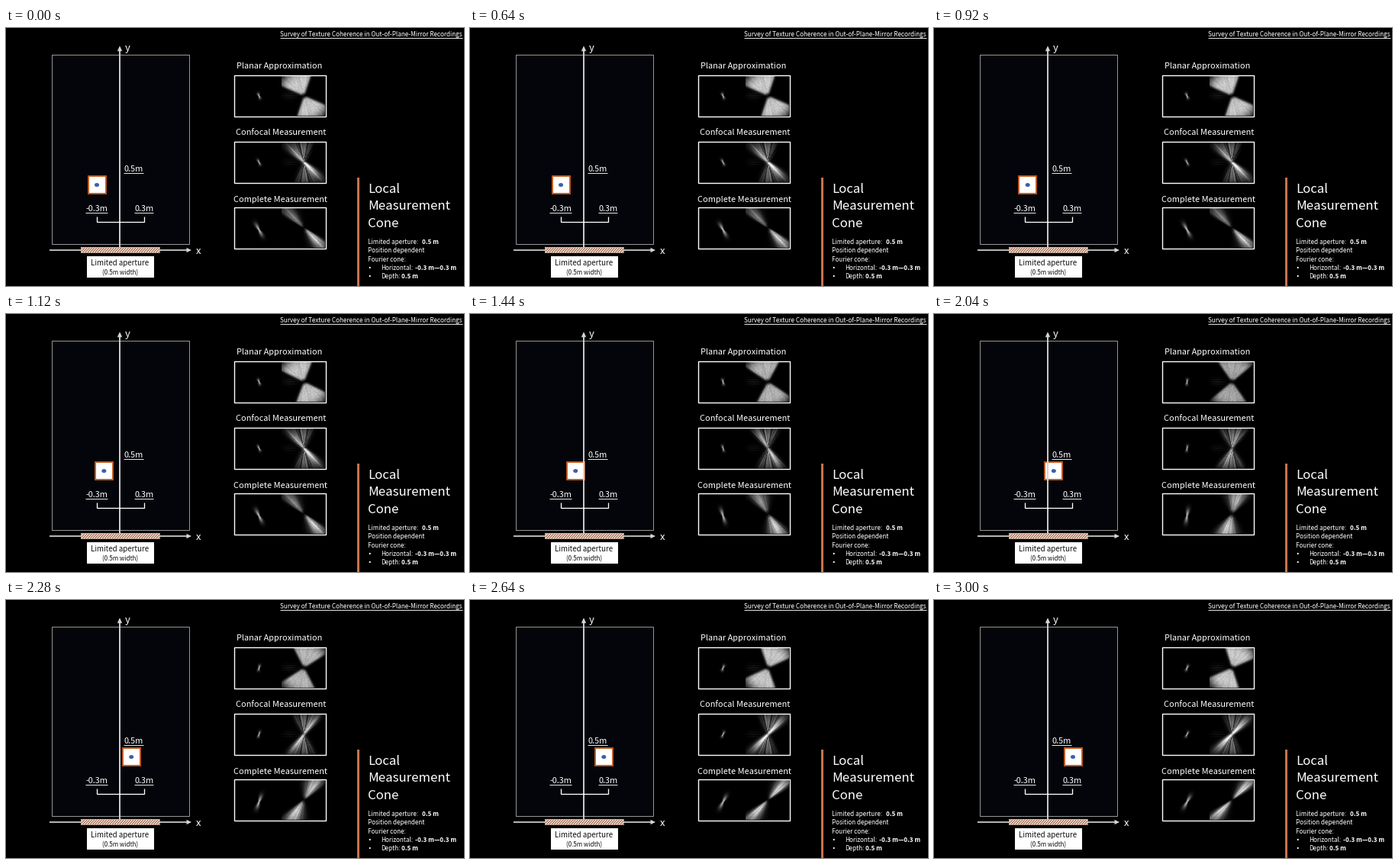
Animation, 600 px wide and 338 px high, one loop 3040 ms. Source, as a matplotlib script:

```python
import numpy as np
import matplotlib.pyplot as plt
from matplotlib.animation import FuncAnimation
from matplotlib.patches import Ellipse, Polygon, Rectangle

W, H, DPI = 600, 338, 64
PT = 72 / DPI
FRAMES, STEP_MS = 76, 40
HOLD, MOVE = 15, 60
EASE_IN, EASE_OUT = 10.8, 7.2
X_START, X_END, BOX_Y = 119.0, 182.0, 205.6
WHITE, AXIS, ORANGE = "#ffffff", "#d4d4d4", "#c55a1c"

plt.rcParams["font.family"] = "Noto Sans CJK JP"
fig = plt.figure(figsize=(W / DPI, H / DPI), dpi=DPI, facecolor="black")
ax = fig.add_axes([0, 0, 1, 1])
ax.axis("off")
ax.set_xlim(0, W)
ax.set_ylim(H, 0)


def label(x, y, text, size, color=WHITE, ha="left", weight="normal"):
    return ax.text(x, y, text, fontsize=size * PT, color=color, ha=ha,
                   va="baseline", weight=weight, zorder=6)


def line(xs, ys, width=1.0, color=WHITE, z=4):
    return ax.plot(xs, ys, color=color, lw=width * PT, zorder=z,
                   solid_capstyle="butt", solid_joinstyle="miter")[0]


def rect(x, y, w, h, face="none", edge="none", width=0.0, z=2):
    return ax.add_patch(Rectangle((x, y), w, h, facecolor=face, edgecolor=edge,
                                  lw=width * PT, zorder=z, joinstyle="miter"))


def underlined(x, y, text, size, gap, ha="left"):
    box = label(x, y, text, size, ha=ha).get_window_extent()
    line([box.x0, box.x1], [y + gap, y + gap], 0.9)


# Scene with its axes
rect(59.5, 34.5, 180, 248, "#04050a", "#a6a6a6", 0.9, z=1)
line([149, 149], [29, 290], 1.9, AXIS)
ax.add_patch(Polygon([(149, 23.3), (145.8, 30.3), (152.2, 30.3)],
                     color=AXIS, lw=0, zorder=4))
line([57, 238], [291, 291], 1.7, AXIS)
ax.add_patch(Polygon([(243, 291), (236.5, 287.9), (236.5, 294.1)],
                     color=AXIS, lw=0, zorder=4))
label(156, 30, "y", 13)
label(249, 295.7, "x", 13)

underlined(154.3, 188.3, "0.5m", 10.9, 1.9)
underlined(104.3, 240.4, "-0.3m", 10.9, 1.7)
underlined(168.3, 240.4, "0.3m", 10.9, 1.7)
line([118.5, 118.5, 181.2, 181.2], [247, 254.3, 254.3, 247], 1.3)

# Hatched aperture
bar = rect(98, 286.7, 102.5, 7, WHITE, z=5)
for x in np.arange(91, 204, 3.2):
    line([x, x + 7], [294, 286.5], 1.3, "#a8694a", z=5).set_clip_path(bar)
rect(98, 286.7, 102.5, 7, edge="#d9b9a4", width=0.8, z=5)
rect(105.8, 298.7, 88.5, 28.5, WHITE, z=5)
label(149.3, 311, "Limited aperture", 9.75, "#111111", "center")
label(150, 323.5, "(0.5m width)", 8, "#111111", "center")

# Text column
underlined(597.5, 11.3, "Survey of Texture Coherence in Out-of-Plane-Mirror Recordings",
           8.12, 1.7, "right")
rect(460, 196, 3, 142, "#c9734a")
for y, word in zip((216, 238.5, 261), ("Local", "Measurement", "Cone")):
    label(473.8, y, word, 16.75)
label(474.4, 283, "Limited aperture:", 8.1)
label(545, 283, "0.5 m", 8.1, weight="bold")
label(474.4, 294.3, "Position dependent", 8.1)
label(474.4, 305.5, "Fourier cone:", 8.1)
for y, name, x, value in ((316.7, "Horizontal:", 535.5, "-0.3 m\u20140.3 m"),
                          (327.8, "Depth:", 518.5, "0.5 m")):
    ax.add_patch(Ellipse((476.7, y - 2.8), 2.2, 2.2, color=WHITE, lw=0, zorder=6))
    label(491, y, name, 8.1)
    label(x, y, value, 8.1, weight="bold")

# Measurement panels: spatial glint on the left, Fourier cone on the right
PX, PW, PH = 299, 119, 53
cols, rows = np.meshgrid(np.arange(PW) + 0.5, np.arange(PH) + 0.5)
gx, gy = cols - 32.5, 27.0 - rows
cx, cy = cols - 91.5, 26.8 - rows
radius = np.hypot(cx, cy)
angle = np.arctan2(cx * np.where(cy < 0, -1, 1), np.abs(cy))
cone_half = cols > 62
rng = np.random.default_rng(4)
speckle = rng.normal(0, 0.03, (PH, PW))
waves = [(f, rng.uniform(0, 2 * np.pi)) for f in (9, 14, 23, 31, 42)]
streaks = sum(np.cos(f * angle + p) for f, p in waves) / len(waves)
smudge = (0.1 * np.exp(-((cx + 19) / 10) ** 2 - (cy / 5) ** 2)
          * (0.6 + 0.4 * np.cos(cy * 2.1)))


def soft(d):
    return 1 / (1 + np.exp(-np.clip(d, -30, 30)))


def across(x, y, slope):
    return (x - slope * y) / np.hypot(1, slope)


def glint(slope, length, width, gain, drop=0):
    y = gy + drop
    d = across(gx, y, slope)
    along = (slope * gx + y) / np.hypot(1, slope)
    spread = width * (0.7 + np.abs(along) / length)
    return gain * np.exp(-(d / spread) ** 2 - (along / length) ** 2)


def planar(lean):
    edge = (0.74 - np.abs(angle - 0.42 * lean)) * radius
    tone = 0.5 + 0.2 * abs(lean) + 0.12 * np.minimum(radius / 24, 1)
    wedge = soft(edge * 1.3) * (tone + 0.08 * streaks + speckle)
    fade = np.exp(-(radius / 35) ** 6) * np.minimum(radius / 5, 1)
    return (wedge * fade + smudge) * cone_half + glint(0.4 * lean, 3.7, 1.2, 0.75)


def confocal(lean):
    edge = 0.8 * np.abs(cy) - np.abs(cx - 0.35 * lean * cy)
    fan = soft(edge * 0.6) * (0.36 + 0.36 * streaks + speckle)
    fan = fan * np.exp(-(radius / 29) ** 4) * np.minimum(radius / 3, 1)
    d = across(cx, cy, 1.12 * lean)
    side = np.where(cy < 0, 1, 0.78 + 0.15 * lean)
    ray = np.exp(-(d / (1.5 + 0.13 * radius)) ** 2 - (radius / 25) ** 2)
    cone = fan + ray * side * (0.2 + 0.65 * abs(lean)) + 0.7 * smudge
    return cone * cone_half + glint(0.5 * lean, 3.8, 1.1, 0.75)


def complete(lean):
    d = cx - 1.03 * lean * cy
    width = 1.4 + (0.5 - 0.08 * abs(lean)) * np.abs(cy)
    side = np.where(cy < 0, 0.92, 0.74 + 0.18 * lean)
    reach = np.exp(-((radius - 18) / 22) ** 2) * np.minimum(radius / 6, 1)
    beam = np.exp(-(d / width) ** 2) * side * reach
    cone = beam * (0.88 + 0.25 * streaks + speckle)
    return cone * cone_half + glint(0.55 * lean, 8.5, 1.6, 0.75, drop=2.5)


panels = []
for top, base, x, title, draw in (
        (62, 53.2, 358, "Planar Approximation", planar),
        (149, 140.2, 360, "Confocal Measurement", confocal),
        (235, 227.5, 360, "Complete Measurement", complete)):
    label(x, base, title, 10.95, ha="center")
    img = ax.imshow(np.zeros((PH, PW)), cmap="gray", vmin=0, vmax=1, aspect="auto",
                    interpolation="nearest", zorder=2,
                    extent=(PX, PX + PW, top + PH, top))
    rect(PX - 0.5, top - 0.5, 120, 54, edge=WHITE, width=1.4, z=3)
    panels.append((img, draw))
ax.set_xlim(0, W)
ax.set_ylim(H, 0)

# Moving marker, drawn below the axis
marker = rect(0, BOX_Y - 11.5, 23, 23, WHITE, ORANGE, 1.9, z=3)
dot = ax.add_patch(Ellipse((0, BOX_Y), 5.4, 4.4, facecolor="#3560b8",
                           edgecolor="#24468c", lw=0.5 * PT, zorder=3.1))


def progress(frame):
    n = min(max(frame - HOLD, 0), MOVE)
    total = MOVE - (EASE_IN + EASE_OUT) / 2
    if n < EASE_IN:
        dist = n * n / (2 * EASE_IN)
    elif n < MOVE - EASE_OUT:
        dist = n - EASE_IN / 2
    else:
        dist = total - (MOVE - n) ** 2 / (2 * EASE_OUT)
    return dist / total


def update(frame):
    p = progress(frame)
    x = X_START + (X_END - X_START) * p
    marker.set_x(x - 11.5)
    dot.set_center((x, BOX_Y))
    lean = np.sin((p - 0.5) * np.pi)
    for img, draw in panels:
        img.set_data(np.clip(draw(lean), 0, 1))
    return [marker, dot] + [img for img, _ in panels]


anim = FuncAnimation(fig, update, frames=FRAMES, interval=STEP_MS,
                     repeat=True, repeat_delay=0, blit=False)
plt.show()
```
